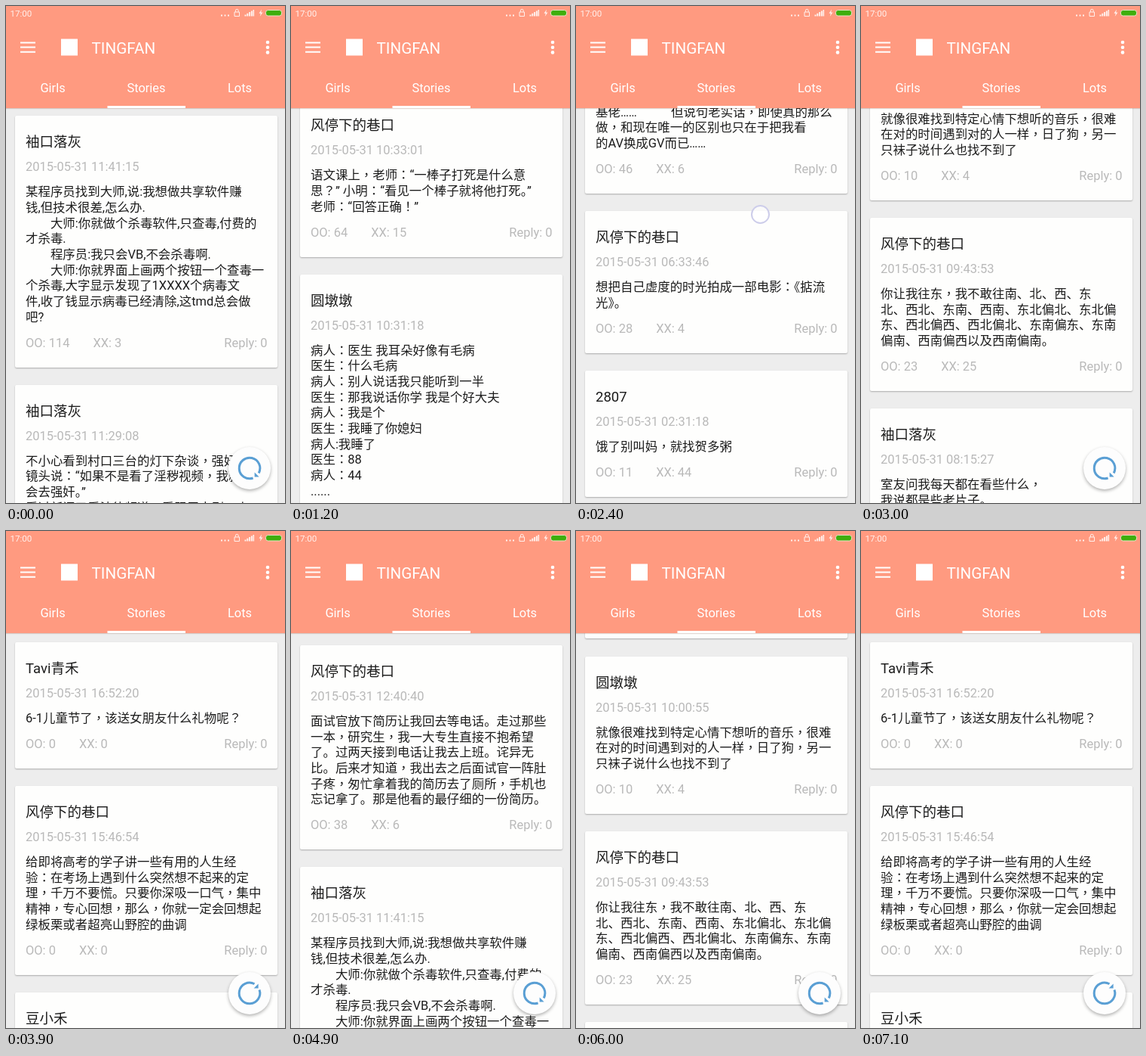
Animation of 370 by 657 pixels, one loop 7200 ms. Source, as an HTML page:

```html
<!DOCTYPE html>
<html lang="zh-CN">
<head>
<meta charset="utf-8">
<title>Stories</title>
<style>
html, body { margin: 0; width: 100%; height: 100%; overflow: hidden; background: #eee; }
body { font-family: Roboto, "Noto Sans CJK SC", "Noto Sans CJK", sans-serif; }
#stage { position: absolute; left: 0; top: 0; width: 370px; height: 657px; overflow: hidden; background: #ededed; }
#list { position: absolute; left: 0; top: 0; width: 370px; will-change: transform; }
.card { position: absolute; left: 12px; width: 348px; border-radius: 2px; background: #fefefd; box-shadow: 0 1px 2px rgba(0,0,0,.28); font-size: 16.44px; }
.card > div { position: absolute; left: 14px; white-space: pre; }
.name { top: 23px; line-height: 24px; font-size: 18.5px; color: #1c1c1c; }
.date { top: 58px; line-height: 20px; color: #b9b9b9; }
.body { top: 91px; line-height: 20.65px; color: #1c1c1c; }
.body i { font-family: "Noto Sans CJK TC", "Noto Sans CJK", sans-serif; font-style: normal; line-height: 1px; }
.foot { bottom: 22px; right: 13.5px; line-height: 20px; color: #b9b9b9; }
.foot span { margin-right: 31px; }
.foot b { position: absolute; right: 0; font-weight: 400; }
#bar { position: absolute; left: 0; top: 0; width: 370px; height: 135px; background: #ff9a80; box-shadow: 0 1px 1px rgba(120,60,40,.2); }
#bar svg { position: absolute; left: 0; top: 0; }
#bar div { position: absolute; color: #fff; line-height: 24px; white-space: pre; }
.tab { top: 97px; width: 124px; text-align: center; font-size: 16.44px; }
#fab, #ring { position: absolute; left: 0; top: 0; }
#fab { left: 294.5px; top: 583px; width: 56px; height: 56px; border-radius: 50%; background: #fdfdfd; box-shadow: 0 2px 4px rgba(0,0,0,.3); }
#ring { width: 21px; height: 21px; margin: -12px; border: 2px solid #cdcdea; border-radius: 50%; background: rgba(255,255,255,.7); }
</style>
</head>
<body>
<div id="stage">
  <div id="list"></div>
  <div id="ring"></div>
  <div id="fab">
    <svg id="icon" width="56" height="56" viewBox="-28 -28 56 56">
      <path d="M13 -4.6A13.8 13.8 0 1 1 6.5 -12.2" fill="none" stroke="#5a9fd4" stroke-width="3"/>
      <path d="M11.6 -12.6V-6.6H5.6Z" fill="#5a9fd4"/>
    </svg>
  </div>
  <div id="bar">
    <svg width="370" height="136" fill="#fff">
      <path d="M19 47.5h20v2h-20zM19 53.6h20v2h-20zM19 59.8h20v2h-20z"/>
      <rect x="73" y="43.5" width="22" height="22"/>
      <circle cx="347" cy="48" r="2.3"/><circle cx="347" cy="54.7" r="2.3"/><circle cx="347" cy="61.4" r="2.3"/>
      <rect x="134.5" y="132" width="103.5" height="3"/>
      <g opacity=".85">
        <path d="M285 11.5h2v2h-2zM289.5 11.5h2v2h-2zM294 11.5h2v2h-2z"/>
        <path d="M303 8h6.5v5.5h-6.5zM304.4 8v-1.8a1.9 1.9 0 0 1 3.8 0V8" fill="none" stroke="#fff"/>
        <path d="M316.5 11.5h2v2h-2zM319.3 9.8h2v3.7h-2zM322.1 8h2v5.5h-2zM324.9 6.4h2v7.1h-2zM327.5 5h1.6v8.5h-1.6z"/>
        <path d="M339 4.5l-3.5 5.3h2.3l-1 4 3.7-5.4h-2.4z"/>
      </g>
      <rect x="344.5" y="5.5" width="21" height="7.5" rx="3" fill="#3fae0c" stroke="#e9e3c8"/>
    </svg>
    <div style="left:5.5px;top:-2.5px;font-size:11.6px;opacity:.85">17:00</div>
    <div style="left:113.5px;top:43.5px;font-size:20.7px">TINGFAN</div>
    <div class="tab" style="left:0">Girls</div>
    <div class="tab" style="left:124px">Stories</div>
    <div class="tab" style="left:248px">Lots</div>
  </div>
</div>
<script>
const LOOP = 7200, STEP = 100, TOP = 147, LINE = 20.65;
const KNEE = '袖口落灰', LANE = '风停下的巷口', ROUND = '圆墩墩';

// name, time, OO, XX, body
const cards = [
  ['Tavi青禾', '16:52:20', 0, 0, '6-1儿童节了，该送女朋友什么礼物呢？'],
  [LANE, '15:46:54', 0, 0, '给即将高考的学子讲一些有用的人生经\n验：在考场上遇到什么突然想不起来的定\n理，千万不要慌。只要你深吸一口气，集中\n精神，专心回想，那么，你就一定会回想起\n绿板栗或者超亮山野腔的曲调'],
  ['豆小禾', '13:20:16', 21, 5, '今天去买西瓜，问老板甜不甜。\n老板说：“不甜不要钱！”\n我说：“那来个不甜的。”'],
  [LANE, '12:40:40', 38, 6, '面试官放下简历让我回去等电话。走过那些\n一本，研究生，我一大专生直接不抱希望\n了。过两天接到电话让我去上班。诧异无\n比。后来才知道，我出去之后面试官一阵肚\n子疼，匆忙拿着我的简历去了厕所，手机也\n忘记拿了。那是他看的最仔细的一份简历。'],
  [KNEE, '11:41:15', 114, 3, '某程序员找到大师,说:我想做共享软件赚\n钱,但技术很差,怎么办.\n　　大师:你就做个杀毒软件,只查毒,付费的\n才杀毒.\n　　程序员:我只会VB,不会杀毒啊.\n　　大师:你就界面上画两个按钮一个查毒一\n个杀毒,大字显示发现了1XXXX个病毒文\n件,收了钱显示病毒已经清除,这tmd总会做\n吧?'],
  [KNEE, '11:29:08', 52, 9, '不小心看到村口三台的灯下杂谈，强奸犯对\n镜头说：“如果不是看了淫秽视频，我就不\n会去强奸。”\n看过新闻又看法律频道，看跟屁虫剧，小\n偷可从来没说过是看了什么。'],
  ['豆小禾', '10:52:40', 33, 7, '闹钟响了三遍，我终于鼓起勇气，\n伸手把它关掉，然后继续睡。\n醒来一看，天都黑了，\n还好今天是周日。'],
  [LANE, '10:33:01', 64, 15, '语文课上，老师：“一棒子打死是什么意\n思？” 小明：“看见一个棒子就将他打死。”\n老师：“回答正确！”'],
  [ROUND, '10:31:18', 47, 12, '病人：医生 我耳朵好像有毛病\n医生：什么毛病\n病人：别人说话我只能听到一半\n医生：那我说话你学 我是个好大夫\n病人：我是个\n医生：我睡了你媳妇\n病人:我睡了\n医生：88\n病人：44\n......'],
  [ROUND, '10:00:55', 10, 4, '就像很难找到特定心情下想听的音乐，很难\n在对的时间遇到对的人一样，日了狗，另一\n只袜子说什么也找不到了'],
  [LANE, '09:43:53', 23, 25, '你让我往东，我不敢往南、北、西、东\n北、西北、东南、西南、东北偏北、东北偏\n东、西北偏西、西北偏北、东南偏东、东南\n偏南、西南偏西以及西南偏南。'],
  [KNEE, '08:15:27', 46, 6, '室友问我每天都在看些什么，\n我说都是些老片子。\n他说看多了会变的，小心以后成了\n基佬……　　   但说句老实话，即使真的那么\n做，和现在唯一的区别也只在于把我看\n的AV换成GV而已……'],
  [LANE, '06:33:46', 28, 4, '想把自己虚度的时光拍成一部电影：《掂流\n光》。'],
  ['2807', '02:31:18', 11, 44, '饿了别叫妈，就找贺多粥'],
  ['豆小禾', '01:12:05', 19, 8, '夜深了，冰箱又在叫我的名字。']
];

const $ = id => document.getElementById(id);
const list = $('list'), fab = $('fab'), icon = $('icon'), ring = $('ring');

function add(parent, cls, html) {
  const el = document.createElement('div');
  el.className = cls;
  el.innerHTML = html;
  parent.appendChild(el);
  return el;
}

// These marks sit in the middle of their square
const centreMarks = text => text.replace(/[，：？！]/g, '<i lang="zh-TW">$&</i>');

const tops = [];
let y = 0;
for (const [name, time, oo, xx, body] of cards) {
  const lines = body.split('\n').length;
  const card = add(list, 'card', '');
  card.style.top = y + 'px';
  card.style.height = 146.4 + LINE * lines + 'px';
  add(card, 'name', name);
  add(card, 'date', '2015-05-31 ' + time);
  add(card, 'body', centreMarks(body));
  add(card, 'foot', `<span>OO: ${oo}</span>XX: ${xx}<b>Reply: 0</b>`);
  tops.push(y);
  y += 169.4 + LINE * lines;
}

// List shift that puts a card's top edge at the given height
const place = (card, top) => top - tops[card];

const scroll = [
  [0, place(4, 145)], [600, place(4, 145)], [1200, place(7, 123)], [1800, place(9, 150)],
  [2400, place(12, 271)], [2900, place(10, 190)], [3300, place(9, 165)], [3500, place(9, 165)],
  [3800, TOP], [4300, TOP], [4900, place(3, 151)], [5600, place(11, 145)],
  [6000, place(9, 165)], [6700, TOP], [LOOP, TOP]
];
const fabDrop = [[0, 0], [700, 0], [1000, 90], [2500, 90], [2900, 0], [5000, 0], [5200, 90], [5600, 90], [5900, 0], [LOOP, 0]];
const spin = [[0, 90], [3500, 90], [3800, 360], [4300, 360], [4700, 450], [6200, 450], [6700, 720], [LOOP, 720]];

const linear = p => p;
const easeOut = p => 1 - (1 - p) ** 2;

function track(keys, t, ease) {
  const i = keys.findIndex(k => k[0] > t);
  const [t0, a] = keys[i - 1], [t1, b] = keys[i];
  return a + (b - a) * ease((t - t0) / (t1 - t0));
}

function touchAt(t) {
  if (t >= 2300 && t <= 2500) return [244, 275 + (t - 2400) * .3];
  if (t === 4800) return [265, 530];
  return null;
}

function draw() {
  const t = Math.floor(performance.now() % LOOP / STEP) * STEP;
  list.style.transform = `translateY(${Math.round(track(scroll, t, easeOut))}px)`;
  fab.style.transform = `translateY(${track(fabDrop, t, linear)}px)`;
  icon.style.transform = `rotate(${track(spin, t, linear)}deg)`;
  const touch = touchAt(t);
  ring.style.display = touch ? 'block' : 'none';
  if (touch) ring.style.transform = `translate(${touch[0]}px, ${touch[1]}px)`;
  requestAnimationFrame(draw);
}
draw();
</script>
</body>
</html>
```
